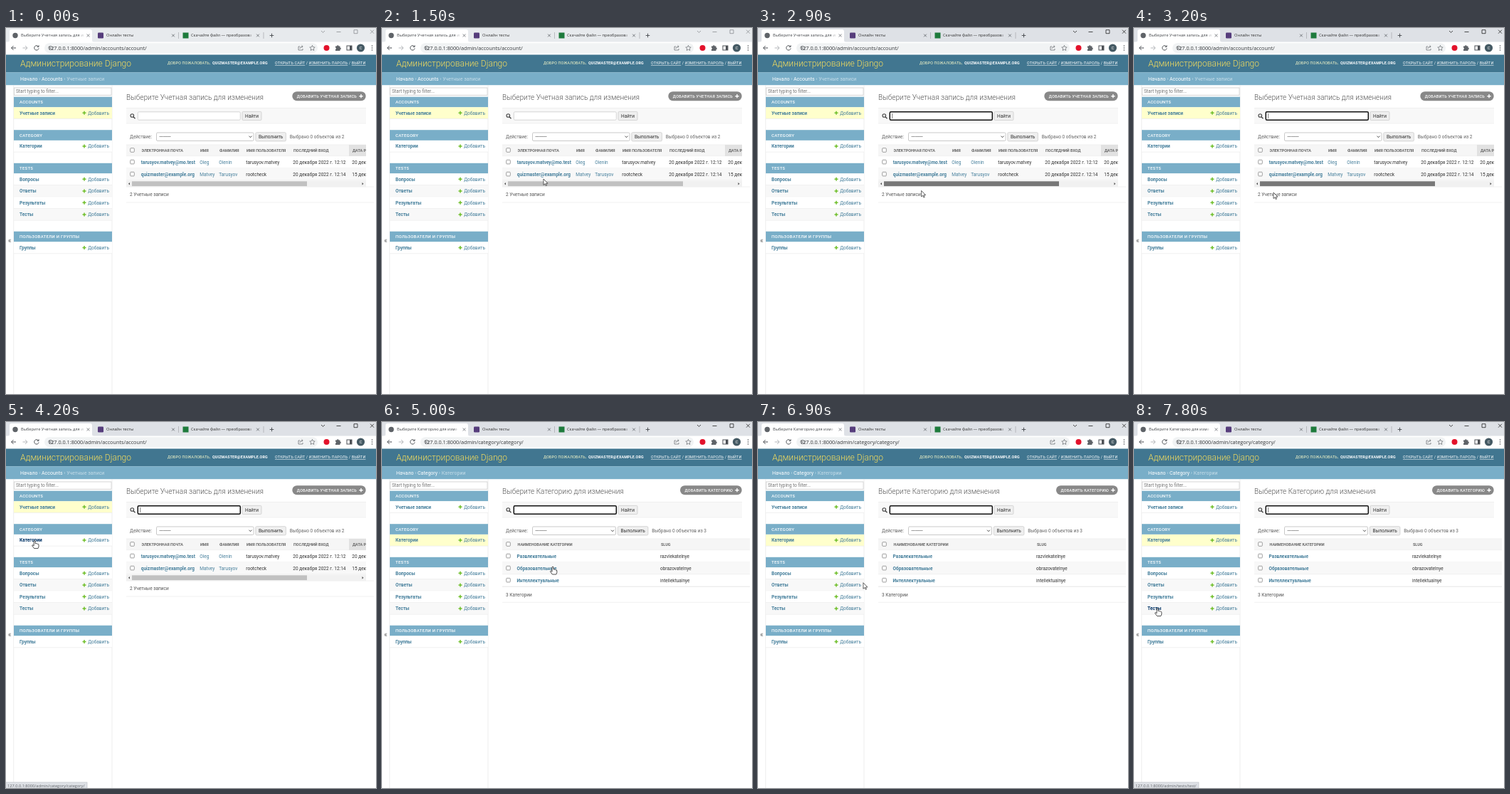
These frames come from a looping animation (520 px wide and 514 px high, 8000 ms). An HTML page:

```html
<!DOCTYPE html>
<html lang="ru">
<head>
<meta charset="utf-8">
<title>Администрирование Django</title>
<style>
  html, body { margin: 0; width: 100%; height: 100%; overflow: hidden; background: #fff; }
  svg { display: block; width: 520px; height: 514px; font: 6.5px Roboto, sans-serif; }
  text { white-space: pre; }
  .ui { font-family: "Open Sans", sans-serif; }
  .b { font-weight: 700; }
  .caps { letter-spacing: .25px; }
  .link { fill: #447e9b; }
  .hover { fill: #003366; }
  .u { text-decoration: underline; text-decoration-color: #ffffff80; text-decoration-thickness: .5px; }
</style>
</head>
<body>
<svg id="stage" viewBox="0 0 520 514"></svg>
<script>
const LOOP = 8000, PRESS = 1800, RELEASE = 3300, LOAD = 4400;
const CATEGORY_URL = '127.0.0.1:8000/admin/category/category/';

// Drawing helpers; text is placed by its vertical centre.
const text = (x, y, s, size = 6.5, attrs = '') =>
  `<text x="${x}" y="${y + size * .35}" style="font-size:${size}px" fill="#333" ${attrs}>${s}</text>`;
const rect = (x, y, w, h, fill, attrs = '') =>
  `<rect x="${x}" y="${y}" width="${w}" height="${h}" fill="${fill}" ${attrs}/>`;
const line = (d, color = '#5f6368', width = 1, attrs = '') =>
  `<path d="${d}" fill="none" stroke="${color}" stroke-width="${width}" ${attrs}/>`;
const dot = (x, y, r, fill, attrs = '') => `<circle cx="${x}" cy="${y}" r="${r}" fill="${fill}" ${attrs}/>`;
const group = (id, body, attrs = '') => `<g id="${id}" ${attrs}>${body}</g>`;
const rule = (y, x1 = 169, x2 = 517, color = '#ebebeb') => line(`M${x1} ${y}H${x2}`, color, .7);
const plus = (x, y, r, color, w) => line(`M${x - r} ${y}h${2 * r}M${x} ${y - r}v${2 * r}`, color, w);
const cross = (x, y, r, id = '') => line(`M${x - r} ${y - r}l${2 * r} ${2 * r}m0 ${-2 * r}l${-2 * r} ${2 * r}`, '#5f6368', .8, id);
const checkbox = y => rect(174.7, y - 3, 5.6, 5.6, '#fff', 'rx="1" stroke="#767676" stroke-width=".7"');
const button = (x, y, w, label) =>
  rect(x, y - 6.3, w, 12.2, '#efefef', 'rx="1.5" stroke="#c8c8c8" stroke-width=".7"') +
  text(x + w / 2, y, label, 6.5, 'text-anchor="middle"');

function browser() {
  const strong = 'class="b" style="fill:#fff"';
  return group('strip', rect(0, 0, 520, 21, 'currentColor')) +
    '<path d="M2 20q3 0 3-3V5q0-3 3-3H118q3 0 3 3V17q0 3 3 3Z" fill="#fff"/>' +
    rect(0, 19.5, 520, 18, '#fff') +
    dot(13, 10.5, 3.7, '#5f6368') +
    rect(129, 6.5, 8, 8, '#563d7c', 'rx="1.3"') + rect(248.5, 6.5, 8, 8, '#1e7b3c') +
    text(141, 10.5, 'Онлайн тесты', 5.65, 'class="ui"') +
    text(260, 10.5, 'Скачайте файл — преобразов<tspan fill-opacity=".4">а</tspan>', 5.65, 'class="ui"') +
    cross(115.5, 10.5, 1.9) + cross(235, 10.5, 1.9) + cross(354, 10.5, 1.9) +
    line('M242.5 6v9M362 6v9', '#9a9da1', .6) + plus(373.5, 10.5, 2.8, '#45484c', .9) +
    group('windowButtons',
      '<path d="M443 4l2.5 2.4L448 4M464.500 5.500h6M489 2.700h5v5h-5ZM512 2.700l5 5m0-5l-5 5" fill="none" stroke="currentColor" stroke-width=".8"/>') +
    line('M14 28H7.500m3-3l-3 3 3 3', '#4d5156') + line('M23.500 28H30m-3-3l3 3-3 3', '#b4b7ba') +
    line('M45.500 26a3.200 3.200 0 1 0 .6 2.500M46 24.300v2.200h-2.200', '#4d5156') +
    rect(54, 21.3, 384, 13.6, '#f1f3f4', 'rx="6.8"') +
    dot(62.5, 28, 2.7, 'none', 'stroke="#5f6368" stroke-width=".7"') + line('M62.500 27.600v1.900M62.500 26.200v.7', '#5f6368', .7) +
    line('M413 26h-2v5h6v-2M413 29q0-3 4-3m-1.500-1.600l1.700 1.600-1.700 1.600', '#5f6368', .7) +
    line('M430.500 24.400l1.100 2.400 2.600.3-1.900 1.800.5 2.600-2.300-1.300-2.300 1.300.5-2.600-1.900-1.800 2.600-.3Z', '#5f6368', .7) +
    dot(450.5, 28, 4, '#e3122b') +
    '<path d="M463 25.600h2a1.300 1.300 0 0 1 2.600 0h1.900v2a1.300 1.300 0 0 1 0 2.600v1.700H463v-2a1.300 1.300 0 0 0 0-2.500Z" fill="#5f6368"/>' +
    rect(479, 25, 7, 6, 'none', 'stroke="#4d5156"') + rect(483, 25, 3, 6, '#4d5156') +
    dot(498.5, 28, 5.6, '#455a64') + text(498.5, 28, 'C', 5.6, 'text-anchor="middle" style="fill:#fff"').replace('style="font-size:5.6px" fill="#333"', 'font-size="5.6"') +
    [25, 28, 31].map(y => dot(514.5, y, .8, '#4d5156')).join('') +
    rect(0, 37.5, 520, 24.7, '#417690') + rect(0, 62.2, 520, 18, '#79aec8') +
    `<g style="--c:#ffc">` +
    label(20, 50, 'Администрирование Django', 12.1, '#f5dd5d', 'font-weight="300"') +
    label(227, 49.5, 'ДОБРО ПОЖАЛОВАТЬ,', 5.35, '#ffc', 'letter-spacing=".2"') +
    label(290, 49.5, 'QUIZMASTER@EXAMPLE.ORG', 5.35, '#fff', 'class="b" letter-spacing=".15"') +
    label(505.5, 49.5, '<tspan class="u">ОТКРЫТЬ САЙТ</tspan> / <tspan class="u">ИЗМЕНИТЬ ПАРОЛЬ</tspan> / <tspan class="u">ВЫЙТИ</tspan>',
      5.35, '#fff', 'text-anchor="end" letter-spacing=".2"') + '</g>';
}

function label(x, y, s, size, color, attrs = '') {
  return `<text x="${x}" y="${y + size * .35}" font-size="${size}" fill="${color}" ${attrs}>${s}</text>`;
}

function sidebar() {
  const caption = (y, s) => rect(11, y, 138, 14.6, '#79aec8') + label(19, y + 7.3, s, 6, '#fff', 'class="caps" font-weight="500"');
  const row = (y, s, id, fill = '#fff') =>
    rect(11, y - 8, 138, 16, fill, `id="${id}Row"`) + rule(y + 8.2, 11, 149) +
    label(19, y, s, 6.5, '#447e9b', `id="${id}" class="b"`) +
    plus(110, y, 2.5, '#70bf2b', 1.5) + label(145, y, 'Добавить', 6.5, '#447e9b', 'text-anchor="end"');
  return line('M10.700 80V514M149 80V514', '#e6e6e6', .7) +
    label(5, 298.5, '«', 10, '#666', 'text-anchor="middle"') +
    rect(11.5, 84, 136.500, 10.3, '#fff', 'stroke="#ccc" stroke-width=".8"') +
    label(14, 89, 'Start typing to filter...', 6.5, '#757575') +
    caption(96.7, 'ACCOUNTS') + row(119.3, 'Учетные записи', 'accounts') +
    caption(143.2, 'CATEGORY') + row(166, 'Категории', 'category') +
    caption(189.8, 'TESTS') + row(212.3, 'Вопросы', 'questions') + row(229, 'Ответы', 'answers', '#f8f8f8') +
    row(245.3, 'Результаты', 'results') + row(262, 'Тесты', 'tests', '#f8f8f8') +
    caption(285.7, 'ПОЛЬЗОВАТЕЛИ И ГРУППЫ') + row(308.5, 'Группы', 'groups');
}

// Everything that the two list pages lay out in the same way.
function listPage({ tab, url, crumbs, title, add, pillX, selectW, count, total, totalY }) {
  const [app, model] = crumbs, selectEnd = 211.5 + selectW;
  return label(21, 10.5, tab.slice(0, -1) + `<tspan fill-opacity=".4">${tab.slice(-1)}</tspan>`, 5.65, '#45484c', 'class="ui"') +
    label(59, 28, url, 7.28, '#333639', 'class="ui"') +
    label(20, 71.3, `Начало <tspan fill="#c4dce8">›</tspan> ${app} <tspan fill="#c4dce8">› ${model}</tspan>`, 7, '#fff') +
    label(169, 97, title, 10.05, '#555', 'font-weight="300"') +
    rect(pillX, 89.2, 505.700 - pillX, 13, '#888', 'rx="6.5"') +
    label(pillX + 6.5, 95.7, add, 5.5, '#fff', 'class="caps" font-weight="500"') + plus(499, 95.7, 2.6, '#fff', 1.4) +
    label(174, 152.7, 'Действие:', 6.5, '#666') +
    rect(211.5, 147, selectW, 11.5, '#fff', 'rx="1.5" stroke="#bbb" stroke-width=".8"') + label(215.5, 152.7, '---------', 6.5, '#333') +
    line(`M${selectEnd - 6.5} 151.700l2 2 2-2`, '#333', .9) +
    button(selectEnd + 2.8, 153, 42.6, 'Выполнить') +
    label(selectEnd + 50.7, 152.7, `Выбрано 0 объектов из ${count}`, 6.5, '#666') +
    label(174, totalY, total, 6.5, '#555') + rule(totalY - 10.9) + rule(totalY + 11);
}

const header = (x, s) => label(x, 172, s, 5.45, '#666', 'class="b"');
const frame = (x2, rows) => rect(169, 164, x2 - 169, 16, '#f6f6f6') + rule(164, 169, x2) + rule(180, 169, x2) + checkbox(171.7) +
  Array.from({ length: rows }, (_, i) => {
    const y = 188.3 + 17 * i;
    return rect(169, y - 8, x2 - 169, 16.6, i % 2 ? '#f8f8f8' : '#fff') + rule(y + 8.6, 169, x2) + checkbox(y);
  }).join('');

function accountsTable() {
  const columns = [190.5, 273, 300, 338, 404, 487, 573];
  const names = ['ЭЛЕКТРОННАЯ ПОЧТА', 'ИМЯ', 'ФАМИЛИЯ', 'ИМЯ ПОЛЬЗОВАТЕЛЯ', 'ПОСЛЕДНИЙ ВХОД', 'ДАТА РЕГИСТРАЦИИ', 'АКТИВЕН'];
  const people = [
    ['tarusyov.matvey@mo.test', 'Oleg', 'Olenin', 'tarusyov.matvey', '20 декабря 2022 г. 12:12', '20 декабря 2022 г. 12:12'],
    ['quizmaster@example.org', 'Matvey', 'Tarusyov', 'rootcheck', '20 декабря 2022 г. 12:14', '15 декабря 2022 г. 14:46']];
  return frame(607, 2) + rect(482, 164, 86, 16, '#e2e2e2') +
    names.map((s, i) => header(columns[i], s)).join('') +
    '<path d="M559.500 172.500h5l-2.500 2.700Z" fill="#999"/>' +
    people.map((cells, r) => {
      const y = 188.3 + 17 * r;
      return cells.map((s, i) => label(columns[i] - .7, y, s, 6.5, i < 3 ? '#447e9b' : '#333', i ? '' : 'class="b"')).join('') +
        dot(576.5, y, 3.3, '#70bf2b') + line(`M575 ${y}l1.200 1.300 2.200-2.600`, '#fff', .9);
    }).join('');
}

function categoryTable() {
  const rows = [['Развлекательные', 'razvlekatelnye'], ['Образовательные', 'obrazovatelnye'], ['Интеллектуальные', 'intellektualnye']];
  return frame(517, 3) + header(190.5, 'НАИМЕНОВАНИЕ КАТЕГОРИИ') + header(392, 'SLUG') +
    rows.map(([name, slug], i) => label(189.5, 188.3 + 17 * i, name, 6.5, '#447e9b', 'class="b"') +
      label(391, 188.3 + 17 * i, slug, 6.5, '#333')).join('');
}

const searchBar = rect(169, 112.5, 337, 21.5, '#f8f8f8') + rule(112.5, 169, 506) + rule(134, 169, 506) +
  dot(177.3, 123, 2.3, 'none', 'stroke="#444" stroke-width="1.1"') + line('M179 124.800l2.500 2.500', '#444', 1.4) +
  rect(185.3, 117.8, 144, 11.4, '#fff', 'id="search" rx="1.5"') + line('M188.700 120v7', '#222', .6, 'id="caret"') +
  button(332, 123.7, 27, 'Найти');

const scrollbar = rect(169, 214.5, 337, 8.5, '#f1f1f1') +
  '<path d="M174 217l-2 1.700 2 1.700ZM500.500 217l2 1.700-2 1.700Z" fill="#505050"/>' + rect(177, 215.3, 246, 6.800, '#c1c1c1', 'id="thumb"');

const stage = document.getElementById('stage');
stage.innerHTML = '<clipPath id="tableClip"><rect x="169" y="163" width="337" height="51.5"/></clipPath>' +
  rect(0, 0, 520, 514, '#fff') + browser() + sidebar() + searchBar +
  group('accountsPage', listPage({
    tab: 'Выберите Учетная запись для и', url: '127.0.0.1:8000/admin/accounts/account/', crumbs: ['Accounts', 'Учетные записи'],
    title: 'Выберите Учетная запись для изменения', add: 'ДОБАВИТЬ УЧЕТНАЯ ЗАПИСЬ', pillX: 402.3, selectW: 136.5,
    count: 2, total: '2 Учетные записи', totalY: 234
  }) + `<g clip-path="url(#tableClip)">${group('table', accountsTable())}</g>` + scrollbar) +
  group('categoryPage', categoryTable() + listPage({
    tab: 'Выберите Категорию для изме', url: CATEGORY_URL, crumbs: ['Category', 'Категории'],
    title: 'Выберите Категорию для изменения', add: 'ДОБАВИТЬ КАТЕГОРИЮ', pillX: 419, selectW: 117,
    count: 3, total: '3 Категории', totalY: 242.3
  })) +
  group('status', rect(-1, 506, 92, 9, '#dee1e6', 'id="statusBox" stroke="#bfc3c8" stroke-width=".7"') +
    label(2, 510.700, '', 5.65, '#5f6368', 'id="statusText" class="ui"')) +
  group('arrow', '<path d="M0 0V8.500L2 6.700 3.300 9.600 4.600 9 3.300 6.200H6Z" fill="#fff" stroke="#222" stroke-width=".7"/>') +
  group('hand', '<path d="M-1 .7Q0-.6 1 .7V4Q2 3.300 2.700 4.300 3.700 3.700 4.300 4.800 5.800 4.500 5.800 6V8.500L4.800 11H-.6L-3.400 7.200Q-3.500 5.800-2.300 6.200L-1 7.200Z" fill="#fff" stroke="#222" stroke-width=".8"/>');

const el = id => document.getElementById(id);
const show = (id, on) => el(id).setAttribute('display', on ? 'inline' : 'none');
const set = (id, attrs) => Object.entries(attrs).forEach(([k, v]) => el(id).setAttribute(k, v));

// Pointer stops: time, x, y.
const path = [[300, 447, 413], [1100, 232, 213], [1500, 227, 212], [1800, 240, 216], [2100, 290, 223], [2400, 314, 224],
  [2700, 300, 224], [3000, 205, 230], [3200, 196, 231], [3500, 110, 240], [3800, 42, 166], [4500, 39, 167], [4800, 247, 201],
  [5000, 240, 203], [5400, 228, 190], [5700, 232, 204], [6000, 241, 197], [6400, 232, 199], [6800, 160, 222],
  [7300, 44, 258], [7700, 32, 261], [7800, 33, 261.5]];

function pointer(t) {
  const i = path.findIndex(p => p[0] > t);
  if (i < 0) return path[path.length - 1].slice(1);
  const [t0, x0, y0] = path[Math.max(i - 1, 0)], [t1, x1, y1] = path[i];
  const k = Math.max(0, (t - t0) / (t1 - t0)), e = k * k * (3 - 2 * k);
  return [x0 + (x1 - x0) * e, y0 + (y1 - y0) * e];
}

function draw(time) {
  const t = Math.min(Math.floor(time % LOOP / 100) * 100, 7800);
  const [x, y] = pointer(t);
  const onCategory = t >= LOAD, focused = t >= PRESS, dragging = focused && t < RELEASE;

  show('accountsPage', !onCategory);
  show('categoryPage', onCategory);
  set('accountsRow', { fill: onCategory ? '#fff' : '#ffffcc' });
  set('categoryRow', { fill: onCategory ? '#ffffcc' : '#fff' });
  set('strip', { color: focused ? '#dee1e6' : '#e7eaed' });
  set('windowButtons', { color: focused ? '#222' : '#8b8e92' });
  set('search', { stroke: focused ? '#101010' : '#ccc', 'stroke-width': focused ? 1.5 : .8 });
  show('caret', focused && (t - (onCategory ? LOAD : PRESS)) % 1000 < 500);

  const shift = dragging ? Math.min(74, Math.max(0, x - 240)) : 0;
  set('thumb', { x: 177 + shift, fill: dragging ? '#787878' : t >= 1600 && t < PRESS ? '#a8a8a8' : '#c1c1c1' });
  set('table', { transform: `translate(${-shift * 1.4})` });

  const overCategory = t >= 3800 && t <= 4500, overTests = t >= 7500;
  const overRow = t >= 4800 && t <= 5200;
  set('category', { class: overCategory ? 'b hover' : 'b' });
  set('tests', { class: overTests ? 'b hover' : 'b' });
  show('status', overCategory || overTests);
  el('statusText').textContent = overTests ? '127.0.0.1:8000/admin/tests/test/' : CATEGORY_URL;
  set('statusBox', { width: overTests ? 92 : 115 });

  const hand = overCategory || overTests || overRow;
  show('hand', hand);
  show('arrow', !hand && t >= 300);
  for (const id of ['hand', 'arrow']) set(id, { transform: `translate(${x} ${y})` });
}

(function tick() {
  draw(performance.now());
  requestAnimationFrame(tick);
})();
</script>
</body>
</html>
```
